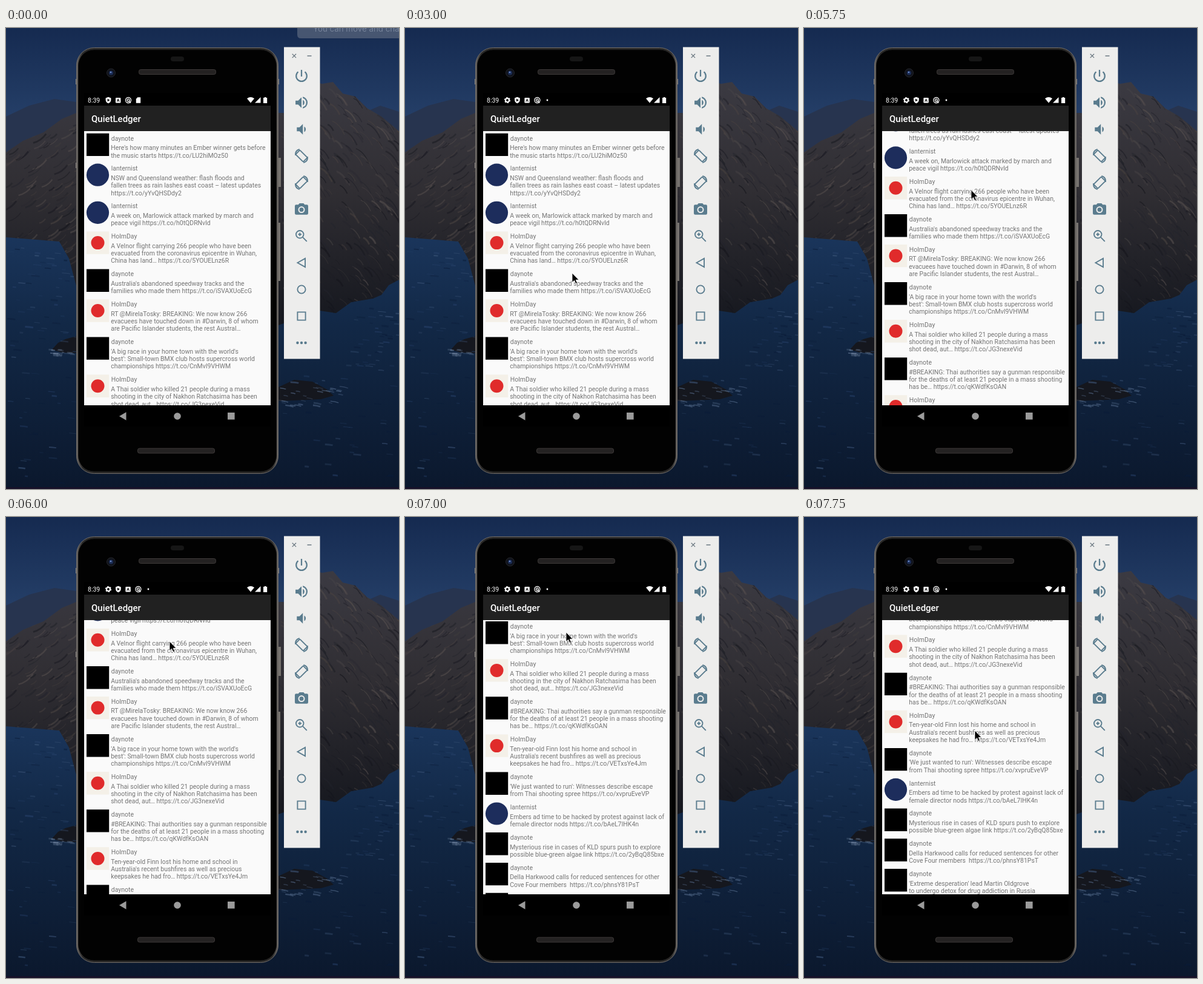
An HTML page that plays this animation: 649x760 px, repeating every 8 s.

```html
<!DOCTYPE html>
<html lang="en">
<head>
<meta charset="utf-8">
<title>Phone feed</title>
<style>
  html, body { margin: 0; width: 100%; height: 100%; overflow: hidden; background: #0c1a33; }
  svg { display: block; }
  text { white-space: pre; font-family: Roboto, sans-serif; }
  #feed text { font-size: 10.48px; fill: #747474; }
</style>
</head>
<body>
<svg width="649" height="760" viewBox="0 0 649 760">
  <defs>
    <linearGradient id="sky" x2="0" y2="1">
      <stop stop-color="#152a50"/><stop offset="1" stop-color="#2a4670"/>
    </linearGradient>
    <linearGradient id="sea" x2="0" y2="1">
      <stop stop-color="#1a355b"/><stop offset=".35" stop-color="#122846"/><stop offset="1" stop-color="#0b182d"/>
    </linearGradient>
    <linearGradient id="cliff" x2="0" y2="1">
      <stop stop-color="#3b3a42"/><stop offset=".45" stop-color="#302e33"/><stop offset="1" stop-color="#15171e"/>
    </linearGradient>
    <linearGradient id="edge" x2="1">
      <stop stop-color="#6b6763"/><stop offset=".03" stop-color="#2b2a29"/>
      <stop offset=".97" stop-color="#2b2a29"/><stop offset="1" stop-color="#6b6763"/>
    </linearGradient>
    <clipPath id="listArea"><path d="M129 170h308v452h-308z"/></clipPath>
    <clipPath id="land"><path id="landShape" d="M0 205L28 186 62 172 92 150 116 140H460L500 86 522 92 540 89 556 108 577 113 596 132 620 146 649 170V415L632 424 620 440 606 446 570 452 545 470 518 466 450 490 116 425 104 380 88 352 0 345Z"/></clipPath>
  </defs>

  <!-- wallpaper -->
  <path d="M0 0h649v200H0z" fill="url(#sky)"/>
  <path d="M0 146L38 128 80 117 116 122V350H0zM590 140L618 128 649 138V240H590z" fill="#27344f"/>
  <path d="M0 345H649V760H0z" fill="url(#sea)"/>
  <use href="#landShape" fill="url(#cliff)"/>
  <g id="cracks" clip-path="url(#land)" fill="none"></g>
  <path d="M76 530L86 519 98 513 116 508V536L92 535zM450 592L476 580 506 583 530 596 541 606 520 612 450 615z" fill="#15171e"/>
  <g id="foam" fill="none"></g>
  <path d="M0 757h649v3H0z" fill="#171128"/>
  <g id="banner">
    <path d="M481 0H649V17H487Q481 17 481 11z" fill="#475671"/>
    <text x="507" y="6" font-size="13.3" fill="#76839a" style="font-family:Inter,sans-serif">You can move and change</text>
  </g>

  <!-- phone body -->
  <path d="M450 214h4v48h-4zM450 321h3v96h-3z" fill="#77736f"/>
  <path d="M115 84h3v9h-3zM115 222h3v9h-3zM448 84h3v9h-3z" fill="#8b8783"/>
  <rect x="116.5" y="32.5" width="333" height="702" rx="29" fill="url(#edge)" stroke="#706c68"/>
  <rect x="119.5" y="36" width="327" height="695" rx="26" fill="#020202" stroke="#111"/>
  <rect x="272" y="47" width="22" height="8" rx="4" fill="#161616"/>
  <g fill="#242222" stroke="#3d3938">
    <rect x="219.5" y="68.5" width="127" height="8" rx="3"/>
    <rect x="217.5" y="693" width="127" height="8" rx="3"/>
  </g>
  <circle cx="173.5" cy="74" r="7" fill="#10131b" stroke="#25262b"/>
  <circle cx="173.5" cy="74" r="3.6" fill="#1b2c55"/>
  <circle cx="173" cy="73" r="1.3" fill="#6d8ccb"/>

  <!-- screen -->
  <path d="M129 107h308v550h-308z"/>
  <path d="M129 128h308v42h-308z" fill="#212121"/>
  <path d="M129 170h308v452h-308z" fill="#fafafa"/>
  <text x="135" y="123" font-size="10.5" fill="#fff">8:39</text>
  <g fill="#fff">
    <path d="M398 116.2Q404 112 410 116.2L404 123.5zM420.5 114V123.5H411z"/>
    <path d="M425 115h1.8v-1h2.6v1h1.8v9h-6.2z"/>
  </g>
  <g id="gear" transform="translate(169 119)" fill="none" stroke="#fff">
    <circle r="3" stroke-width="2.2"/>
    <circle r="4.3" stroke-width="1.6" stroke-dasharray="2.25"/>
  </g>
  <g id="alerts" fill="#fff">
    <path d="M169 113.7l4.4 1.9v3q0 4-4.4 5.7q-4.4-1.7-4.4-5.7v-3z"/>
    <path d="M167.6 116.6v4.6l3.8-2.3z" fill="#000"/>
    <rect x="181" y="115" width="8.4" height="8.4" rx="1"/>
    <path d="M183.3 121.5l1.9-4.7 1.9 4.7M184 120h2.4" fill="none" stroke="#000"/>
    <g fill="none" stroke="#fff" stroke-width="1.3">
      <circle cx="202" cy="119" r="4.5"/>
      <circle cx="202" cy="119" r="1.9"/>
      <path d="M203 120l3 3.5"/>
    </g>
  </g>
  <path id="card" d="M217.3 114.3h4.9v9.4h-7.4v-6.8z" fill="#fff"/>
  <circle id="more" cx="235" cy="119" r="1.4" fill="#fff"/>
  <text x="141" y="155" font-size="14.97" font-weight="500" fill="#fff">QuietLedger</text>
  <g clip-path="url(#listArea)"><g id="feed"></g></g>
  <g fill="#9b9b9b">
    <path d="M187 640L198.5 633.3V646.7zM366 634h11.6v11.6H366z"/>
    <circle cx="283" cy="640" r="5.8"/>
  </g>

  <!-- emulator toolbar -->
  <path d="M459 31.5h59.5V545.5H459z" fill="#ededec"/>
  <path d="M472.7 42.7l6.4 6.4m0-6.4l-6.4 6.4M497.5 46h7" stroke="#6c7982" stroke-width="1.3"/>
  <g id="tools" fill="#5a7c8e"></g>

  <path id="cursor" d="M0 0V15.5L3.6 12.2 6 17.6 8.5 16.5 6.2 11.3H11z" stroke="#fff" stroke-width=".8"/>
</svg>
<script>
const $ = id => document.getElementById(id);

// Wallpaper texture
let seed = 7;
const rand = (min, max) => {
  seed = (seed * 16807) % 2147483647;
  return min + (max - min) * seed / 2147483647;
};
const strokes = (count, [left, top, right, bottom], slope, length, colours) => Array.from({ length: count }, () => {
  const x = rand(left, right), y = rand(top, bottom), l = rand(length / 3, length);
  const colour = colours[Math.floor(rand(0, colours.length))];
  return `<path d="M${x} ${y}q${l * .6} ${l * slope * .2} ${l} ${l * slope}" stroke="${colour}" stroke-width="${rand(.8, 3)}" opacity="${rand(.2, .6)}"/>`;
}).join('');
const rock = ['#14151c', '#1c1d25', '#58514f', '#23242d', '#4b4340'];
$('cracks').innerHTML = strokes(150, [-10, 155, 116, 420], -.7, 24, rock) + strokes(320, [450, 95, 649, 465], 1.1, 22, rock);
$('foam').innerHTML = [[0, 360, 116, 500], [0, 500, 116, 750], [450, 560, 649, 740], [560, 460, 649, 560]]
  .map(area => strokes(40, area, .1, 14, ['#3f587b', '#27416a', '#0b1c38'])).join('')
  + strokes(16, [70, 530, 110, 540], .1, 12, ['#7d91ad']) + strokes(30, [450, 590, 555, 622], .2, 14, ['#60789a']);

// Toolbar icons on a 24 unit grid
const path = d => `<path d="${d}"/>`;
const outline = shape => `<g fill="none" stroke="#5a7c8e" stroke-width="1.7">${shape}</g>`;
const turn = outline('<rect x="7.5" y="4" width="9" height="16" rx="1" transform="rotate(-45 12 12)"/>' +
  path('M3 11Q2 4 9 2M21 13Q22 20 15 22'));
$('tools').innerHTML = [
  path('M13 3h-2v10h2zM17.8 5.2l-1.4 1.4A7 7 0 1 1 7.6 6.6L6.2 5.2A9 9 0 1 0 17.8 5.2z'),
  path('M3 9v6h4l5 5V4L7 9zM16.5 12A4.5 4.5 0 0 0 14 8v8a4.5 4.5 0 0 0 2.5-4zM14 3.2v2.1a7 7 0 0 1 0 13.4v2.1a9 9 0 0 0 0-17.6z'),
  path('M18.5 12A4.5 4.5 0 0 0 16 8v8a4.5 4.5 0 0 0 2.5-4zM5 9v6h4l5 5V4L9 9z'),
  turn,
  `<g transform="matrix(-1 0 0 1 24 0)">${turn}</g>`,
  path('M9 3L7.2 5H4Q2 5 2 7V18Q2 20 4 20H20Q22 20 22 18V7Q22 5 20 5H16.8L15 3z') +
    '<circle cx="12" cy="12.5" r="4.1" stroke="#ededec" stroke-width="1.8"/>',
  outline('<circle cx="9.5" cy="9.5" r="5.7"/><path d="M14 14l6 6M9.5 7v5M7 9.5h5"/>'),
  outline(path('M6 12L17.5 5.5v13z')),
  outline('<circle cx="12" cy="12" r="6"/>'),
  outline(path('M6 6h12v12H6z')),
  '<circle cx="6" cy="12" r="2"/><circle cx="12" cy="12" r="2"/><circle cx="18" cy="12" r="2"/>'
].map((icon, i) => `<g transform="translate(474.8 ${65.8 + i * 44}) scale(1.1)">${icon}</g>`).join('');

// Feed
const square = path('M133 3.7h37.2v37.4H133z');
const accounts = {
  d: ['daynote', square],
  l: ['lanternist', '<circle cx="151.5" cy="22.4" r="18.6" fill="#1d2d5c"/>'],
  h: ['HolmDay', `<g fill="#f4f0e8">${square}</g><circle cx="151.5" cy="22.4" r="11" fill="#e02b2b"/>`]
};
const posts = `d|Here's how many minutes an Ember winner gets before|the music starts https://t.co/LU2hiMOz50
l|NSW and Queensland weather: flash floods and|fallen trees as rain lashes east coast – latest updates|https://t.co/yYvQHSDdy2
l|A week on, Marlowick attack marked by march and|peace vigil https://t.co/h0tQDRNvld
h|A Velnor flight carrying 266 people who have been|evacuated from the coronavirus epicentre in Wuhan,|China has land… https://t.co/5YOUELnz6R
d|Australia's abandoned speedway tracks and the|families who made them https://t.co/iSVAXUoEcG
h|RT @MirelaTosky: BREAKING: We now know 266|evacuees have touched down in #Darwin, 8 of whom|are Pacific Islander students, the rest Austral…
d|'A big race in your home town with the world's|best': Small-town BMX club hosts supercross world|championships https://t.co/CnMvI9VHWM
h|A Thai soldier who killed 21 people during a mass|shooting in the city of Nakhon Ratchasima has been|shot dead, aut… https://t.co/JG3nexeVid
d|#BREAKING: Thai authorities say a gunman responsible|for the deaths of at least 21 people in a mass shooting|has be… https://t.co/qKWdfKsOAN
h|Ten-year-old Finn lost his home and school in|Australia's recent bushfires as well as precious|keepsakes he had fro… https://t.co/VETxsYe4Jm
d|'We just wanted to run': Witnesses describe escape|from Thai shooting spree https://t.co/xvpruEveVP
l|Embers ad time to be hacked by protest against lack of|female director nods https://t.co/bAeL7IHK4n
d|Mysterious rise in cases of KLD spurs push to explore|possible blue-green algae link https://t.co/2yBqQ85bxe
d|Della Harkwood calls for reduced sentences for other|Cove Four members  https://t.co/phnsY81PsT
d|'Extreme desperation' lead Martin Oldgrove|to undergo detox for drug addiction in Russia`.split('\n');
let itemTop = 170;
$('feed').innerHTML = posts.map(post => {
  const [key, ...lines] = post.split('|'), [name, avatar] = accounts[key];
  const body = lines.map((line, i) => `<text x="173.2" y="${31.3 + i * 12.25}">${line}</text>`).join('');
  const item = `<g transform="translate(0 ${itemTop})">${avatar}<text x="173.8" y="15.5">${name}</text>${body}</g>`;
  itemTop += 25.2 + lines.length * 12.3;
  return item;
}).join('');

// Tracks: [ms, values...], linear between points
const pointerTrack = [[250, 600, 90], [1000, 297, 366], [1500, 297, 366], [2000, 284, 387], [2250, 284, 387],
  [3000, 276, 404], [3250, 272, 420], [3500, 269, 418], [4500, 269, 344], [4750, 272, 353], [5000, 286, 383],
  [5500, 286, 383], [5750, 276, 267], [6000, 270, 205], [6500, 284, 404], [7000, 266, 190], [7250, 268, 164], [7750, 282, 352]];
const scrollTrack = [[0, 0], [5500, 0], [5750, 90.4], [6000, 151.4], [6500, 151.4], [6750, 230], [7000, 337.3], [7250, 376.9]];
function at(track, t) {
  const next = track.findIndex(point => point[0] > t);
  if (next < 1) return track.at(next).slice(1);
  const a = track[next - 1], b = track[next], k = (t - a[0]) / (b[0] - a[0]);
  return a.slice(1).map((v, i) => v + (b[i + 1] - v) * k);
}
const show = (id, opacity) => $(id).setAttribute('opacity', +opacity);
const move = (id, x, y) => $(id).setAttribute('transform', `translate(${x} ${y})`);

function draw(now) {
  const t = Math.floor(now % 8000 / 250) * 250;
  const geared = t >= 2500;
  show('banner', Math.max(0, 1 - t / 500));
  show('gear', geared);
  show('more', geared);
  show('card', !geared);
  show('cursor', t >= 250);
  move('alerts', geared ? 16.4 : 0, 0);
  move('cursor', ...at(pointerTrack, t));
  move('feed', 0, -at(scrollTrack, t)[0]);
  requestAnimationFrame(draw);
}
requestAnimationFrame(draw);
</script>
</body>
</html>
```
